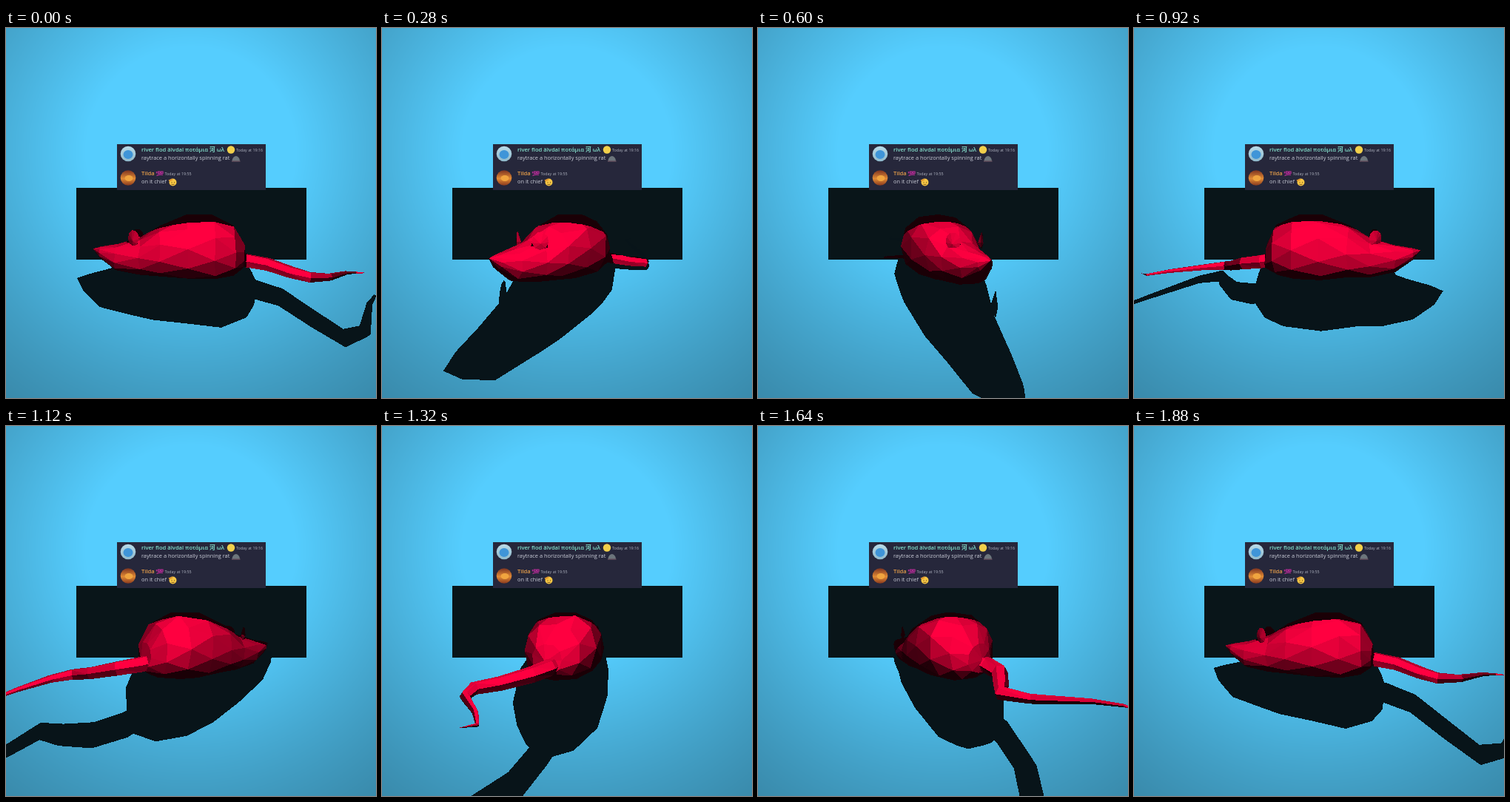
Write an HTML page with a canvas that moves like this. It is 500 px wide and 500 px high and loops after 1.92 s.

```html
<!DOCTYPE html>
<html lang="en">
<head>
<meta charset="utf-8">
<title>Spinning rat</title>
<style>
  html, body { margin: 0; width: 100%; height: 100%; overflow: hidden; background: #55cdfe; }
  canvas, svg { position: absolute; left: 0; top: 0; width: 500px; height: 500px; }
  text { font-family: "Open Sans", "Noto Sans", "Noto Sans CJK SC", sans-serif; font-size: 7.4px; fill: #cbced9; }
  .name { font-size: 7.6px; font-weight: 600; }
  .time { font-size: 5.35px; fill: #b0b4c1; }
</style>
</head>
<body>
<canvas id="stage" width="500" height="500"></canvas>
<svg viewBox="0 0 500 500">
  <defs>
    <linearGradient id="sky" x2="0" y2="1"><stop stop-color="#b9dbe8"/><stop offset="1" stop-color="#8fb9cc"/></linearGradient>
    <linearGradient id="ember" x2="0" y2="1"><stop stop-color="#7d3320"/><stop offset=".55" stop-color="#e08a35"/><stop offset="1" stop-color="#8a3a1e"/></linearGradient>
  </defs>
  <rect x="150" y="157" width="201" height="62" fill="#26273b"/>
  <circle cx="165" cy="170" r="10.3" fill="url(#sky)"/>
  <ellipse cx="165" cy="171" rx="6.5" ry="6" fill="#3f95d8"/>
  <circle cx="165" cy="202.5" r="10.3" fill="url(#ember)"/>
  <ellipse cx="166" cy="203" rx="5.5" ry="4" fill="#f0a43f"/>

  <text class="name" x="183" y="167" style="fill:#84e0cc">river flod älvdal ποτάμια 河 ωλ</text>
  <circle cx="304" cy="164.5" r="5.2" fill="#f1cf4b"/>
  <text class="time" x="311" y="167">Today at 19:16</text>
  <text x="183" y="178">raytrace a horizontally spinning rat</text>
  <path d="M305.5 179.5q1-6.5 5.5-6.5q4.500 1 5 6.500z" fill="#6c757c"/>
  <path d="M305 180h11.500" stroke="#8d6c76" stroke-width=".9"/>

  <text class="name" x="183" y="199" style="fill:#eaa04a">Tilda</text>
  <path d="M203.500 194v2.500m2-2.500h2.500v2.500h-2.500zm4 0h2.500v2.500h-2.500zM203.500 199.500q4-2 8.500-1" fill="none" stroke="#bd2c9c" stroke-width="1.2"/>
  <text class="time" x="214.500" y="199">Today at 19:55</text>
  <text x="183" y="210">on it chief</text>
  <circle cx="225.500" cy="208.500" r="5" fill="#f6c644"/>
  <path d="M219.500 205.500l5-2 1 2-4.500 2z" fill="#e59a2c"/>
  <path d="M224 208v1.200m3.500-1.200v1.200m-4 2q2 .8 4 0" stroke="#5c3a18" stroke-width=".8" fill="none"/>
</svg>
<script>
const SIZE = 500, MID = 250, FOCAL = 500;
const STEPS = 48, STEP_MS = 40;
const LIGHT = { x: 0, y: -0.2, z: 0.5 };
const WALL_Z = 1.2, AXIS_Z = 1, AMBIENT = 0.1;
const PLATE = { z: 0.8, left: 150.6, right: 350.4, top: 157, bottom: 219 };
const WALL_RGB = [85, 205, 254], RAT_RGB = [255, 0, 64];

let seed = 11;
const random = () => (seed = (seed * 16807) % 2147483647) / 2147483647;
const jitter = a => (random() - 0.5) * 2 * a;
const vec = (x, y, z) => ({ x, y, z });
const sub = (a, b) => vec(a.x - b.x, a.y - b.y, a.z - b.z);
const dot = (a, b) => a.x * b.x + a.y * b.y + a.z * b.z;
const cross = (a, b) => vec(a.y * b.z - a.z * b.y, a.z * b.x - a.x * b.z, a.x * b.y - a.y * b.x);
const unit = a => { const n = Math.hypot(a.x, a.y, a.z) || 1; return vec(a.x / n, a.y / n, a.z / n); };

// ---- model, nose towards -x ----
const mesh = [];

function ring(count, turn, point) {
  return Array.from({ length: count }, (_, i) => point((i + turn) / count * 2 * Math.PI));
}

function skin(rings) {
  for (let r = 1; r < rings.length; r++) {
    const a = rings[r - 1], b = rings[r], n = a.length;
    for (let i = 0; i < n; i++) {
      const j = (i + 1) % n;
      mesh.push([a[i], a[j], b[i]], [a[j], b[j], b[i]]);
    }
  }
}

const soft = v => Math.sign(v) * Math.abs(v) ** 0.9;

function addBody() {
  // x, centre y, half height, half width
  const sections = [
    [-0.267, 0.097, 0, 0], [-0.245, 0.107, 0.016, 0.018], [-0.2, 0.119, 0.037, 0.036],
    [-0.135, 0.117, 0.05, 0.055], [-0.08, 0.102, 0.069, 0.075], [-0.01, 0.091, 0.087, 0.09],
    [0.06, 0.091, 0.088, 0.095], [0.11, 0.1, 0.069, 0.074], [0.14, 0.114, 0.036, 0.038],
    [0.148, 0.118, 0, 0]
  ];
  // Each ring is turned half a segment further, which keeps the facets even.
  skin(sections.map(([x, y, h, w], k) => ring(11, k / 2, a => {
    const j = h > 0.03 ? 0.002 : 0;
    return vec(x + jitter(j * 2), y + soft(Math.sin(a)) * h + jitter(j * 0.6),
      0.006 + soft(Math.cos(a)) * w + jitter(j * 0.6));
  })));
}

function addTail() {
  // x, y, z, radius
  const path = [
    [0.12, 0.125, 0.016, 0.02], [0.153, 0.131, 0.018, 0.02], [0.208, 0.139, 0.002, 0.0185],
    [0.259, 0.153, -0.047, 0.016], [0.295, 0.159, -0.085, 0.0138], [0.35, 0.162, -0.065, 0.0095],
    [0.426, 0.164, 0.015, 0.0052], [0.468, 0.169, 0.05, 0.003], [0.493, 0.168, 0.035, 0.0002]
  ];
  skin(path.map(([x, y, z, r], k) => {
    const p = path[Math.max(0, k - 1)], q = path[Math.min(path.length - 1, k + 1)];
    const dir = unit(vec(q[0] - p[0], q[1] - p[1], q[2] - p[2]));
    const side = unit(cross(dir, vec(0, 1, 0))), up = cross(side, dir);
    return ring(6, 0, a => {
      const c = Math.cos(a) * r, s = Math.sin(a) * r;
      return vec(x + side.x * c + up.x * s, y + up.y * s, z + side.z * c + up.z * s);
    });
  }));
}

function addEar(s) {
  const c = vec(-0.15, 0.065, s * 0.037), n = vec(-0.6, 0, s * 0.8);
  const rim = ring(9, 0.25, a => {
    const u = Math.cos(a) * 0.02, v = Math.sin(a) * 0.021;
    return vec(c.x + n.z * u, c.y + v, c.z - n.x * u);
  });
  for (const d of [0.004, -0.009]) {
    const tip = vec(c.x + n.x * d, c.y + 0.006, c.z + n.z * d);
    rim.forEach((p, i) => mesh.push([p, rim[(i + 1) % rim.length], tip]));
  }
}

addBody();
addTail();
addEar(-1);
addEar(1);

// ---- projection ----
const toScreen = p => [MID + FOCAL * p.x / p.z, MID + FOCAL * p.y / p.z, 1 / p.z];

// Where the ray from the light through p meets the plane at depth z.
function cast(p, z) {
  const d = Math.max(p.z - LIGHT.z, 0.01), r = (z - LIGHT.z) / d;
  return [MID + FOCAL * p.x * r / z, MID + FOCAL * (LIGHT.y + (p.y - LIGHT.y) * r) / z, 1 / d];
}

function behindPlate(p) {
  if (p.z <= PLATE.z) return false;
  const [x, y] = cast(p, PLATE.z);
  return x > PLATE.left && x < PLATE.right && y > PLATE.top && y < PLATE.bottom;
}

function raster([a, b, c], plot) {
  const area = (b[0] - a[0]) * (c[1] - a[1]) - (c[0] - a[0]) * (b[1] - a[1]);
  if (Math.abs(area) < 1e-9) return;
  const span = i => [
    Math.max(0, Math.floor(Math.min(a[i], b[i], c[i]))),
    Math.min(SIZE - 1, Math.ceil(Math.max(a[i], b[i], c[i])))
  ];
  const [x0, x1] = span(0), [y0, y1] = span(1);
  for (let y = y0; y <= y1; y++) {
    for (let x = x0; x <= x1; x++) {
      const px = x + 0.5, py = y + 0.5;
      const u = ((b[0] - px) * (c[1] - py) - (c[0] - px) * (b[1] - py)) / area;
      const v = ((c[0] - px) * (a[1] - py) - (a[0] - px) * (c[1] - py)) / area;
      const w = 1 - u - v;
      if (u >= 0 && v >= 0 && w >= 0) plot(x, y, u * a[2] + v * b[2] + w * c[2]);
    }
  }
}

// ---- drawing ----
const ctx = document.getElementById("stage").getContext("2d");
const image = ctx.createImageData(SIZE, SIZE);
const depth = new Float32Array(SIZE * SIZE);
const shade = new Float32Array(SIZE * SIZE);
const wallLight = new Float32Array(SIZE * SIZE);

const unproject = (x, y, z) => vec((x + 0.5 - MID) / FOCAL * z, (y + 0.5 - MID) / FOCAL * z, z);

function put(i, rgb, light) {
  for (let c = 0; c < 3; c++) image.data[i * 4 + c] = rgb[c] * light;
  image.data[i * 4 + 3] = 255;
}

for (let i = 0; i < wallLight.length; i++) {
  const p = unproject(i % SIZE, Math.floor(i / SIZE), WALL_Z);
  const cos = (WALL_Z - LIGHT.z) / Math.hypot(p.x - LIGHT.x, p.y - LIGHT.y, WALL_Z - LIGHT.z);
  wallLight[i] = behindPlate(p) ? AMBIENT : Math.min(1, AMBIENT + cos);
}

function inRatShadow(p) {
  const [x, y, q] = cast(p, WALL_Z);
  if (x < 0 || y < 0 || x >= SIZE || y >= SIZE) return false;
  return shade[Math.floor(y) * SIZE + Math.floor(x)] > q * 1.035;
}

function drawFace(face) {
  const [a, b, c] = face;
  const mid = vec((a.x + b.x + c.x) / 3, (a.y + b.y + c.y) / 3, (a.z + b.z + c.z) / 3);
  const n = unit(cross(sub(b, a), sub(c, a)));
  const facing = dot(n, mid) < 0 ? 1 : -1;
  const cos = facing * dot(n, unit(sub(LIGHT, mid)));
  const lit = Math.min(1, AMBIENT + Math.max(0, cos));
  raster(face.map(toScreen), (x, y, q) => {
    const i = y * SIZE + x;
    if (q <= depth[i]) return;
    depth[i] = q;
    const p = unproject(x, y, 1 / q);
    put(i, RAT_RGB, behindPlate(p) || inRatShadow(p) ? AMBIENT : lit);
  });
}

function draw(step) {
  const angle = step / STEPS * 2 * Math.PI, c = Math.cos(angle), s = Math.sin(angle);
  const turn = p => vec(p.x * c - p.z * s, p.y, AXIS_Z + p.x * s + p.z * c);
  const faces = mesh.map(face => face.map(turn));
  depth.fill(0);
  shade.fill(0);
  for (const face of faces) {
    raster(face.map(p => cast(p, WALL_Z)), (x, y, q) => {
      const i = y * SIZE + x;
      if (q > shade[i]) shade[i] = q;
    });
  }
  for (let i = 0; i < shade.length; i++) put(i, WALL_RGB, shade[i] ? AMBIENT : wallLight[i]);
  faces.forEach(drawFace);
  ctx.putImageData(image, 0, 0);
}

let shown = -1;
function tick() {
  const step = Math.floor(performance.now() / STEP_MS) % STEPS;
  if (step !== shown) draw(shown = step);
  requestAnimationFrame(tick);
}
tick();
</script>
</body>
</html>
```
